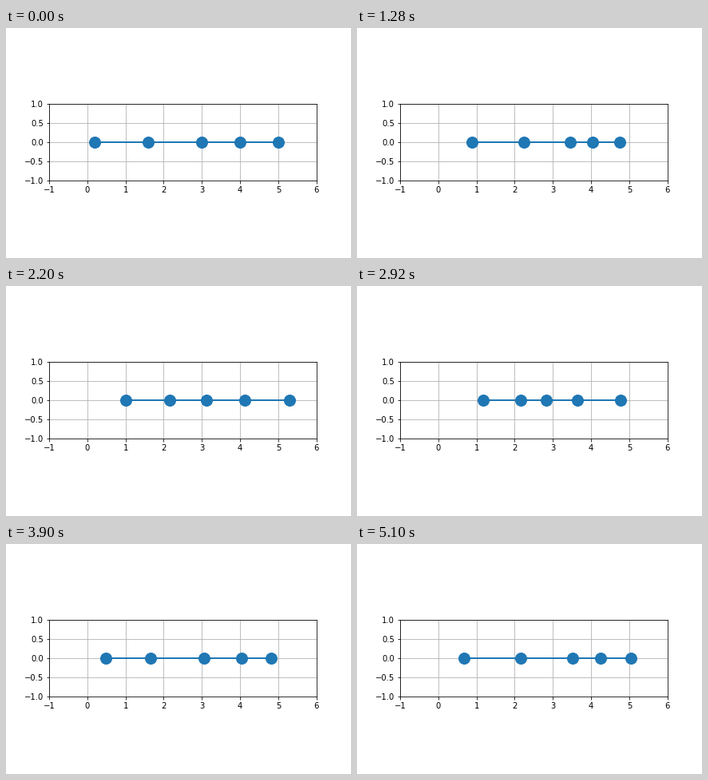
Animation, 432 px wide and 288 px high, one loop 5.12 s. Source, as a matplotlib script:

```python
"""Longitudinal vibration of five beads joined by springs between two walls."""
import numpy as np
import matplotlib.pyplot as plt
from matplotlib.animation import FuncAnimation

N = 5               # beads
STIFFNESS = 12.0    # spring constant / mass
DT = 0.02           # seconds per frame
FRAMES = 256

rest = np.arange(1, N + 1)
start = np.array([0.2, 1.6, 3.0, 4.0, 5.0])

# Normal modes of the chain with fixed ends
k = np.arange(1, N + 1)
modes = np.sin(np.outer(rest, k) * np.pi / (N + 1))
omega = 2 * np.sqrt(STIFFNESS) * np.sin(k * np.pi / (2 * (N + 1)))
amplitude = 2 / (N + 1) * modes.T @ (start - rest)


def positions(t):
    return rest + modes @ (amplitude * np.cos(omega * t))


plt.rcParams["font.family"] = "DejaVu Sans"
plt.rcParams["font.size"] = 10

fig, ax = plt.subplots(figsize=(6, 4), dpi=72)
fig.subplots_adjust(left=0.125, right=0.9, bottom=0.125, top=0.88)
ax.set_xlim(-1, 6)
ax.set_ylim(-1, 1)
ax.set_aspect("equal")
ax.set_xticks(np.arange(-1, 7))
ax.set_yticks(np.arange(-1, 1.1, 0.5))
ax.grid()

chain, = ax.plot(start, np.zeros(N), "o-", color="tab:blue", lw=2,
                 markersize=14)


def update(i):
    chain.set_xdata(positions(i * DT))
    return chain,


anim = FuncAnimation(fig, update, frames=FRAMES, interval=1000 * DT,
                     repeat=True, repeat_delay=0, blit=False)

plt.show()
```
